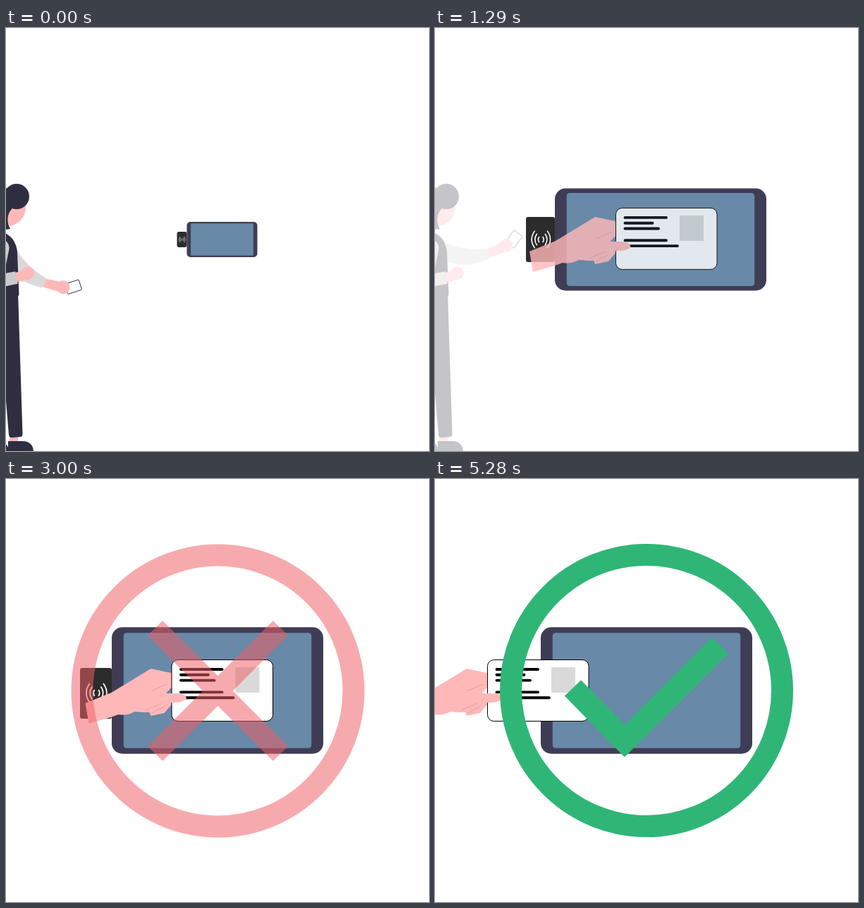
Write an HTML page that moves like this. It is 600 px wide and 600 px high and loops after 5310 ms.

```html
<!DOCTYPE html>
<html lang="en">
<head>
<meta charset="utf-8">
<title>Card reader</title>
<style>
  html, body { margin: 0; width: 100%; height: 100%; overflow: hidden; background: #fff; }
  svg { display: block; width: 100%; height: 100%; }
  .dark { fill: #2f2e41; }
  .skin { fill: #ffb8b8; }
  .sleeve { fill: none; stroke: #cbcbcb; }
  .line { fill: none; stroke: #000; stroke-width: 3.9; stroke-linecap: round; }
  .crease { fill: none; stroke: #d99a9c; stroke-width: .8; }
  .mark { fill: none; stroke-width: 31; }
</style>
</head>
<body>
<svg viewBox="0 0 600 600">
  <rect id="reader" rx="3" fill="#2c2c2c"/>
  <path id="waves" fill="none" stroke="#fff" stroke-width="1.7" stroke-linecap="round"/>
  <rect id="tablet" fill="#3f3d56"/>
  <rect id="screen" fill="#6889a7"/>

  <!-- hand and card, origin at the card's top left corner -->
  <g id="card">
    <path class="skin" d="M-122 62L-85 47L-29 13L4 20V36L-7 47L2 62L-10 76L-29 80L-31 75H-39L-52 74Q-63 80-75 78L-86 82L-117 91Z"/>
    <path class="crease" d="M-27 44L-6 35M-37 72L-14 62M-28 76L-10 67"/>
    <rect x=".5" y=".5" width="143.5" height="87" rx="9" fill="#fff" stroke="#000"/>
    <rect x="91" y="11" width="34" height="36" fill="#d9d9d9"/>
    <path id="text" class="line"/>
    <path class="skin" d="M-13 48H9Q21 49 21.5 55Q18 61 5 61L-8 62Z"/>
  </g>

  <g id="woman">
    <g id="arm">
      <rect x="278.500" y="292" width="21" height="15" rx="1" fill="#fff" stroke="#2f2e41" stroke-width=".9" transform="rotate(-55 289 299.500)"/>
      <path class="skin" d="M252 313L272 304L281 316L253 326Z"/>
      <circle class="skin" cx="278" cy="308.500" r="9.500"/>
      <path fill="#d9d9d9" d="M178 296Q206 318 251 313Q256 320 254 327Q217 345 184 326Z"/>
    </g>
    <g id="foot">
      <path class="skin" d="M148 580h12v8h-12z"/>
      <path class="dark" d="M146 586h21c9 0 15 6 15 15h-36z"/>
    </g>
    <use href="#foot" x="35"/>
    <path class="dark" d="M161 374C150 380 146 392 146 404C146 414 149.500 420 149.500 445L147 578Q147 582 151 582L164 583Q168 583 168.500 579L175 517Q176 515 177 517L182 577Q182.500 581 186 581L198 580Q201.500 580 201.500 576L195 374Z"/>
    <path class="dark" d="M165 288C152 290 145 306 145 322C146 342 154 357 161 376L163 380H195Q196.500 380 196.500 377L194 318C193 302 182 289 165 288Z"/>
    <path class="skin" d="M191 347L204 344V359L191 360Z"/>
    <circle class="skin" cx="208.500" cy="347.800" r="9.500"/>
    <path class="sleeve" stroke-width="25" stroke-linecap="round" d="M170 312L161.500 354"/>
    <path class="sleeve" stroke-width="18" d="M163 360L193 354"/>
    <path class="skin" d="M206 248C208 266 198 278 183 281L176 264L184 248Z"/>
    <path class="dark" d="M184 285C171 288 157 282 150 267C146 258 144 252 144 244C145 229 155 221 164 221C171 221 176 224 179 228L190 253C181 260 177 272 184 285Z"/>
    <circle class="dark" cx="193" cy="239" r="18"/>
  </g>

  <g id="cross" class="mark" stroke="#f05f65">
    <circle cx="300.500" cy="300.500" r="192.500"/>
    <path stroke-width="30" d="M211.500 211.500l178 178m0-178l-178 178"/>
  </g>
  <g id="tick" class="mark" stroke="#2fb677">
    <circle cx="300" cy="300" r="192.500"/>
    <path stroke-width="32.500" d="M195.500 296.500L269 371.500L404.500 236"/>
  </g>
</svg>
<script>
const LOOP = 5310;
const linear = p => p;
const smooth = p => p * p * (3 - 2 * p);
const easeOut = p => 1 - (1 - p) ** 3;
const el = id => document.getElementById(id);
const move = (id, value) => el(id).setAttribute('transform', value);
const fade = (id, value) => el(id).setAttribute('opacity', value);

// Eased progress from 0 to 1 of a step that begins at start.
const step = (t, start, length, ease = smooth) =>
  ease(Math.min(1, Math.max(0, (t - start) / length)));

function centreRect(id, cx, cy, width, height, rx) {
  const attrs = { x: cx - width / 2, y: cy - height / 2, width, height, rx };
  for (const name in attrs) el(id).setAttribute(name, attrs[name]);
}

// Three nested pairs of signal arcs.
const arc = (x, h) => `M${x} ${-h}Q${x * 1.9} 0 ${x} ${h}`;
el('waves').setAttribute('d', [3, 6.5, 10].map(x => arc(x, x * 1.3) + arc(-x, x * 1.3)).join(''));

// Lines of writing on the card: two blocks.
el('text').setAttribute('d', [58.5, 39, 47.5, 58.5, 74.5]
  .map((length, i) => `M13.5 ${14 + i * 7.8 + (i > 2) * 9}h${length}`).join(''));

function drawDevice(t) {
  const zoom = step(t, 750, 580, easeOut), settle = step(t, 1330, 230);
  const cx = 306.5 + 13.5 * zoom - 20 * settle;
  const w = 100 + 200 * zoom, h = 50 + 95 * zoom + 34.5 * settle;
  centreRect('tablet', cx, 300, w, h, w * .05);
  centreRect('screen', cx, 300, w * .888, h * .91, w * .014);

  const rw = 14 + 27 * zoom + 4 * settle, rh = 22 + 42 * zoom + 8 * settle;
  const rx = cx - w / 2 - rw / 2, ry = 300 + 4 * settle;
  centreRect('reader', rx, ry, rw, rh, 3);
  move('waves', `translate(${rx + rw * .02} ${ry - settle * .5}) scale(${rw / 45})`);
}

function drawWoman(t) {
  const enter = step(t, 0, 600), leave = step(t, 750, 600);
  move('woman', `translate(${-178 * (1 - enter) - 182 * leave})`);
  move('arm', `rotate(${37 * (1 - enter)} 180 310)`);
  fade('woman', 1 - step(t, 750, 750, linear));
}

// The hand reaches from a resting place off stage to a different spot on each visit.
function drawCard(t) {
  let x, y, reach, opacity = 1;
  if (t < 1600) {
    const drift = step(t, 1050, 280);
    [x, y] = [274 - 19 * drift, 235 + 21 * drift];
    reach = 1 - step(t, 1330, 230);
    opacity = step(t, 750, 667, linear) * reach;
  } else if (t < 3760) {
    [x, y] = [234.5, 256];
    reach = step(t, 1750, 590) - step(t, 3450, 300);
  } else {
    const lift = step(t, 4530, 510);
    [x, y] = [73 + lift, 287 - 31 * lift];
    reach = step(t, 3770, 370);
  }
  const away = 1 - reach;
  move('card', `translate(${x * reach - 150 * away} ${y * reach + 470 * away})`);
  fade('card', opacity);
}

function draw(t) {
  drawDevice(t);
  drawWoman(t);
  drawCard(t);
  fade('cross', step(t, 2690, 600) - step(t, 3450, 330));
  fade('tick', step(t, 4680, 590));
}

const start = performance.now();
function frame() {
  draw((performance.now() - start) % LOOP);
  requestAnimationFrame(frame);
}
frame();
</script>
</body>
</html>
```
